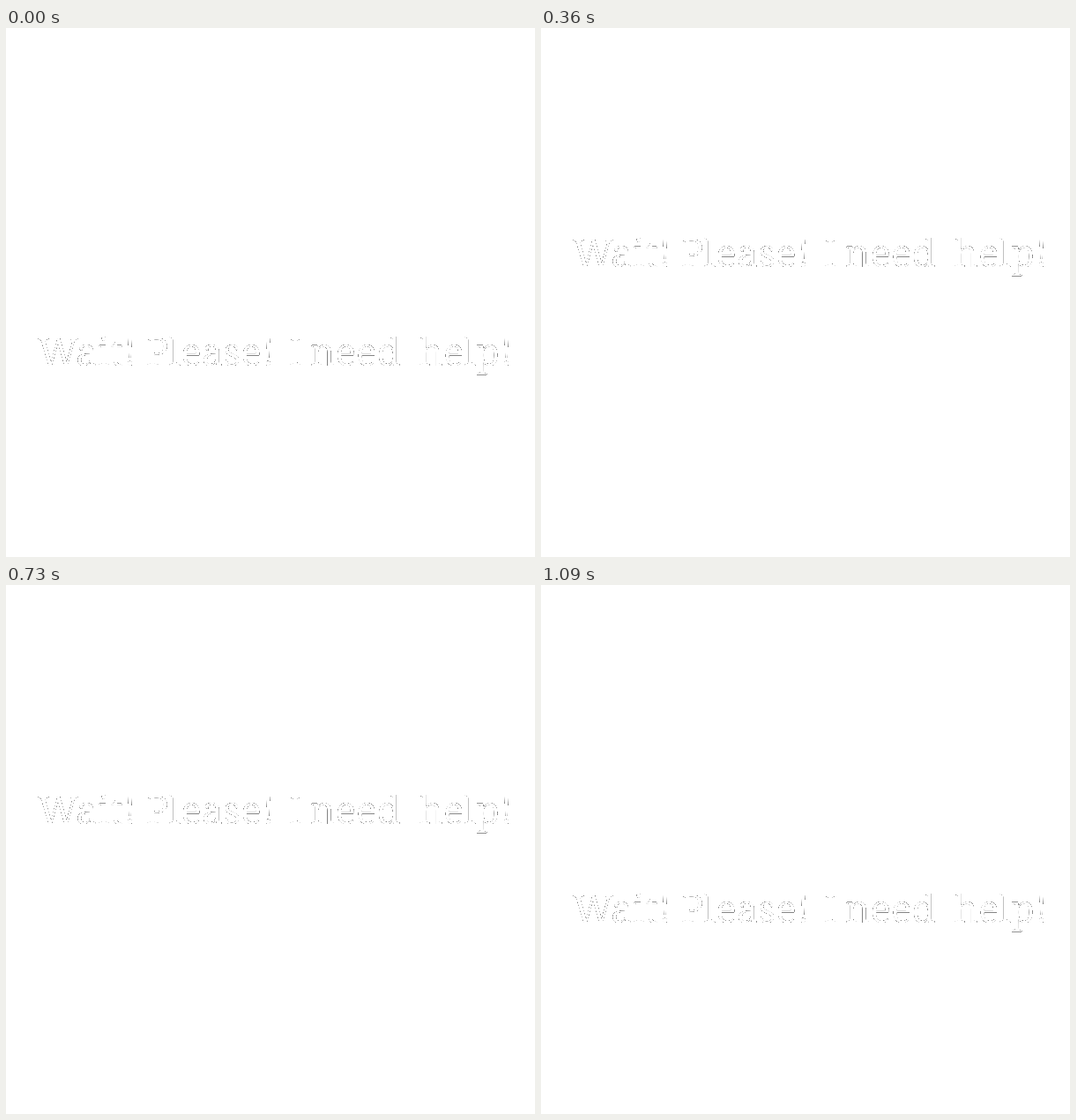
Write an HTML page that moves like this. It is 600 by 600 pixels and loops after 1.12 s.

```html
<!DOCTYPE html>
<html lang="en">
<head>
<meta charset="utf-8">
<title>Bouncing plea</title>
<style>
  html, body { margin: 0; width: 100%; height: 100%; overflow: hidden; background: #fff; }
  svg { display: block; width: 100vw; height: 100vh; }
  text { font: 44px "Noto Serif", "Liberation Serif", serif; fill: #fff; text-rendering: geometricPrecision; }
</style>
</head>
<body>
<svg viewBox="0 0 600 600">
  <!-- Hard-edged transparency: edge pixels over half covered turn opaque grey, the rest vanish. -->
  <filter id="fringe" filterUnits="userSpaceOnUse" x="0" y="0" width="600" height="600"
          color-interpolation-filters="sRGB">
    <feColorMatrix values="0 0 0 1 0  0 0 0 1 0  0 0 0 1 0  0 0 0 1 0"/>
    <feComponentTransfer><feFuncA type="discrete" tableValues="0 1"/></feComponentTransfer>
  </filter>
  <g filter="url(#fringe)">
    <text id="line"><tspan x="36">Wait! </tspan><tspan x="158">Please! </tspan><tspan x="320">I </tspan><tspan x="345">need </tspan><tspan x="468">help!</tspan></text>
  </g>
</svg>
<script>
  const LOOP = 1120, STEP = 30, APEX = 18, APEX_TIME = 550;
  const TOP = 257, DROP = 126;
  const line = document.getElementById("line");

  // The step before the apex is held 10 ms longer than the others.
  function stepAt(t) {
    return t < APEX_TIME
      ? Math.min(APEX - 1, Math.floor(t / STEP))
      : Math.floor((t - 10) / STEP);
  }

  function draw(t) {
    const fall = (stepAt(t) - APEX) / APEX;
    const y = TOP + DROP * fall * fall;
    // The tiny rotation keeps the baseline from snapping to whole pixels.
    line.setAttribute("transform", `translate(0 ${y}) rotate(0.01)`);
  }

  const start = performance.now();
  function tick() {
    draw((performance.now() - start) % LOOP);
    requestAnimationFrame(tick);
  }
  tick();
</script>
</body>
</html>
```
